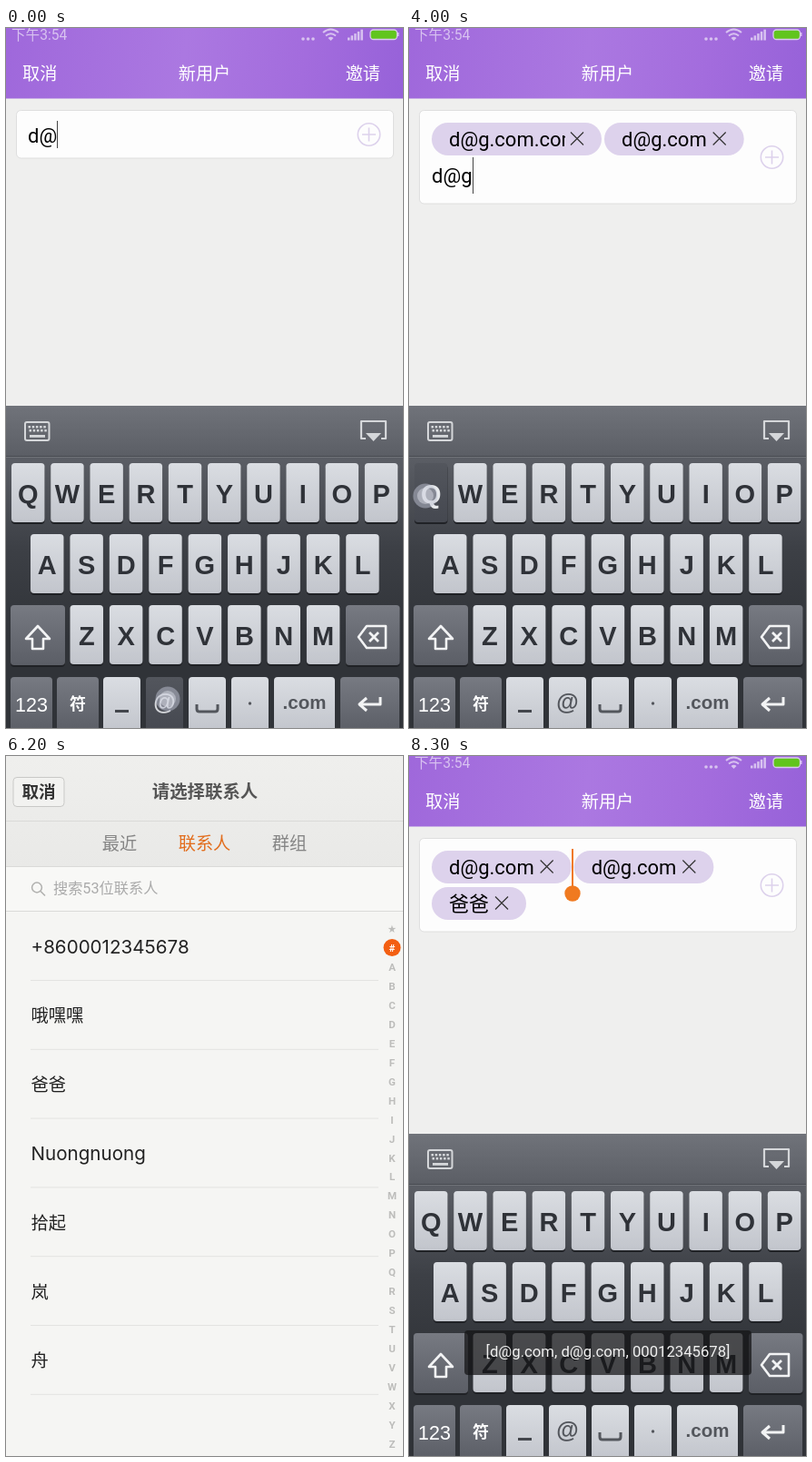
An HTML page with a canvas for the animation above (8600 ms loop, 437 px wide and 769 px high).

```html
<!DOCTYPE html>
<html lang="zh-CN">
<head>
<meta charset="utf-8">
<style>
html, body { margin: 0; width: 100%; height: 100%; overflow: hidden; background: #efefee }
canvas { display: block }
</style>
</head>
<body>
<canvas id="stage" width="437" height="769"></canvas>
<script>
const c = document.getElementById('stage').getContext('2d');
const LOOP = 8600, STEP = 100;
const UI = 'Roboto,"Noto Sans CJK SC","Noto Sans CJK",sans-serif';
const KEYS = '"Liberation Sans",Arial,sans-serif';
const LIST = 'Inter,"Noto Sans CJK SC","Noto Sans CJK",sans-serif';
const MAIL = 'd@g.com', LONG = MAIL + '.com', DAD = '爸爸', PHONE = '00012345678';
const INPUT = 22, CHIP = '#ddd2ec';

// Each entry: start time, chips, text being typed
const edits = [
  [0, [], 'd@'], [200, [], 'd@g'], [500, [], MAIL], [700, [], LONG],
  [1400, [LONG], ''], [1900, [LONG], 'd'], [2100, [LONG], 'd@'], [2300, [LONG], 'd@g'], [2600, [LONG], MAIL],
  [3000, [LONG, MAIL], ''], [3700, [LONG, MAIL], 'd'], [3900, [LONG, MAIL], 'd@'],
  [4000, [LONG, MAIL], 'd@g'], [4200, [LONG, MAIL], MAIL],
  [4400, [LONG, MAIL, MAIL], ''], [6500, [LONG, MAIL, MAIL, DAD], ''], [7100, [MAIL, MAIL, DAD], '']
];

// Each entry: start, end, x, y
const taps = [
  [-100, 100, 178, 737], [100, 300, 22, 512], [400, 600, 330, 742], [600, 800, 330, 742], [1300, 1500, 374, 734],
  [1900, 2100, 19, 514], [2100, 2300, 176, 740], [2300, 2500, 20, 512], [2500, 2800, 328, 740], [3000, 3200, 389, 729],
  [3700, 3900, 16, 512], [3900, 4000, 176, 740], [4000, 4200, 18, 514], [4200, 4300, 328, 741], [4300, 4600, 388, 723],
  [5100, 5300, 399, 142], [6000, 6200, 237, 351], [7000, 7200, 185, 122], [7800, 8000, 402, 49]
];
const cursorOff = [[1000, 1300], [1700, 1900], [3400, 3700], [4800, 5200]];

const clamp = v => Math.max(0, Math.min(1, v));

function fade(y0, y1, ...colors) {
  const g = c.createLinearGradient(0, y0, 0, y1);
  colors.forEach((col, i) => g.addColorStop(i / (colors.length - 1), col));
  return g;
}

function rect(x, y, w, h, fill) {
  c.fillStyle = fill;
  c.fillRect(x, y, w, h);
}

function round(x, y, w, h, r, fill, stroke, lw = 1) {
  c.beginPath();
  c.roundRect(x, y, w, h, r);
  if (fill) { c.fillStyle = fill; c.fill(); }
  if (stroke) { c.strokeStyle = stroke; c.lineWidth = lw; c.stroke(); }
}

function circle(x, y, r, fill, stroke, lw = 1) {
  round(x - r, y - r, 2 * r, 2 * r, r, fill, stroke, lw);
}

function line(d, color, lw = 1, fill) {
  const p = new Path2D(d);
  c.strokeStyle = color;
  c.lineWidth = lw;
  c.lineJoin = 'round';
  if (fill) { c.fillStyle = fill; c.fill(p); }
  if (lw) c.stroke(p);
}

function text(s, x, y, size, color, align = 'left', family = UI, weight = 400) {
  c.font = `${weight} ${size}px ${family}`;
  c.textAlign = align;
  c.fillStyle = color;
  c.fillText(s, x, y);
}

function width(s) {
  c.font = `400 ${INPUT}px ${UI}`;
  return c.measureText(s).width;
}

function header(t) {
  const g = c.createLinearGradient(0, 0, 437, 60);
  g.addColorStop(0, '#9f68db');
  g.addColorStop(.45, '#ab78e1');
  g.addColorStop(.75, '#a36cdd');
  g.addColorStop(1, '#9762d9');
  rect(0, 0, 437, 77.5, g);
  c.save();
  c.globalAlpha = t >= 6500 && t < 6800 ? .6 : 1;
  const pale = '#d8c2f0';
  text('下午3:54', 6, 13, 15.6, pale);
  for (const x of [327, 332.5, 338]) circle(x, 12, 1.8, pale);
  line('M349 5Q357.500 -2 366 5M352 8.500Q357.500 4 363 8.500', pale, 2);
  line('M354.500 11Q357.500 8.500 360.500 11L357.500 14Z', pale, 0, pale);
  for (let i = 0; i < 5; i++) rect(376 + i * 3.6, 10.5 - i * 2.2, 2.5, 3 + i * 2.2, pale);
  round(401, 2, 29.5, 10.5, 3.5, '#61c51d', '#d9ccec', 1.3);
  rect(431, 5, 1.5, 4, pale);
  c.restore();
  text('取消', 18, 57, 19.2, '#fff');
  text('新用户', 218.5, 57, 19.2, '#fff', 'center');
  text('邀请', 412, 57, 19.2, '#fff', 'right');
}

function form(t) {
  const [, chips, typed] = edits.findLast(e => e[0] <= t);
  let x = 25, row = 0, end = 25;
  const placed = chips.map(s => {
    const w = Math.min(width(s), 127) + 60;
    if (x + w > 376) { x = 25; row++; }
    const chip = { s, x, y: 104 + row * 40, w };
    end = x + w;
    x = end + 3;
    return chip;
  });
  const tw = width(typed);
  if (typed && chips.length && x + tw > 376) { x = 25; row++; }
  const h = chips.length ? 62 + row * 40 : 52;

  round(11.5, 90.5, 415, h + .5, 5, '#fdfdfd', '#dedede');
  const py = 91 + h / 2;
  circle(399.5, py, 12.2, null, CHIP, 1.6);
  line(`M392 ${py}h15M399.500 ${py - 7.5}v15`, CHIP, 1.6);

  for (const { s, x, y, w } of placed) {
    round(x, y, w, 36, 18, CHIP);
    c.save();
    c.beginPath();
    c.rect(x, y, w - 40, 36);
    c.clip();
    text(s, x + 19, y + 26, INPUT, '#000');
    c.restore();
    const k = x + w - 27;
    line(`M${k - 7} ${y + 10.5}l14 14m0 -14l-14 14`, '#333', 1.2);
  }

  const tx = chips.length ? x : 24;
  if (typed) text(typed, tx, chips.length ? 130 + row * 40 : 126, INPUT, '#000');
  if (t >= 7100) {
    rect(179, 102, 2, 42, '#f07a20');
    circle(180, 151, 8.7, '#f07a20');
  } else if (!cursorOff.some(([a, b]) => t >= a && t < b)) {
    const cx = typed ? tx + tw : end + 1;
    rect(Math.round(cx), 102 + row * 40, 1, chips.length ? 40 : 30, '#444');
  }
}

function key(x, y, w, h, dark, touch) {
  const down = touch && touch[2] >= x && touch[2] <= x + w && touch[3] >= y && touch[3] <= y + h;
  round(x, y + 2, w, h, 4, '#202226');
  const shades = down ? ['#53565d', '#454850'] : dark ? ['#777a82', '#5b5e66'] : ['#dadde2', '#c2c5cc'];
  round(x, y, w, h, 4, fade(y, y + h, ...shades));
  return down;
}

function keyboard(dy, touch) {
  if (dy >= 354) return;
  c.save();
  c.translate(0, dy);
  rect(0, 415, 437, 56, fade(415, 471, '#70737a', '#5b5e65'));
  rect(0, 471, 437, 298, fade(471, 769, '#5b5e65', '#3d4046', '#303338', '#303338'));
  rect(0, 470, 437, 1, '#484b51');
  rect(0, 471, 437, 1, '#6f7278');

  const pale = '#d5d7da';
  round(21, 433, 26.5, 20, 2, null, pale, 2);
  for (let r = 0; r < 2; r++)
    for (let i = 0; i < 5; i++) rect(24.5 + i * 4.2 + r, 437 + r * 4, 2.5, 2.5, pale);
  rect(26, 447, 17, 2.8, pale);
  line('M396 451H391V432H418V451H413', pale, 2.2);
  line('M396 445h17l-8.500 9z', pale, 0, pale);

  const letters = (s, x, y, step) => [...s].forEach((ch, i) => {
    const kx = x + i * step;
    const down = key(kx, y, 36.5, 65, false, touch);
    text(ch, kx + 18.3, y + 43.5, 29, down ? '#e8eaed' : '#2f3238', 'center', KEYS, 700);
  });
  letters('QWERTYUIOP', 6, 478, 43.2);
  letters('ASDFGHJKL', 27, 556, 43.4);
  letters('ZXCVBNM', 70.5, 634, 43.4);

  key(5, 634, 60, 66, true, touch);
  key(374, 634, 59.5, 66, true, touch);
  line('M35 657L48 671H41V682H29V671H22Z', '#f2f3f4', 2.6);
  line('M397 657H418V681H397L388 669Z', '#f2f3f4', 2.6);
  line('M400 664l10 10m0 -10l-10 10', '#f2f3f4', 2.8);

  const bottom = [[5, 46, 1], [56, 46, 1], [107, 41], [154, 41], [201, 41], [248, 41], [295, 67], [368, 65, 1]]
    .map(([x, w, dark]) => key(x, 713, w, 60, dark, touch));
  const ink = i => bottom[i] ? '#d5d7db' : '#53565c';
  text('123', 28, 751, 21.5, '#fff', 'center', KEYS);
  text('符', 79, 749, 18, '#fff', 'center', UI, 700);
  rect(120, 749, 15, 3, '#43464c');
  text('@', 174.5, 749, 25, ink(3), 'center', KEYS, 700);
  line('M210 743V748Q210 751 213 751H230Q233 751 233 748V743', '#53565c', 3);
  circle(268.5, 742, 1.7, '#53565c');
  text('.com', 328.5, 748, 20.5, ink(6), 'center', KEYS, 700);
  line('M412 735V743H391M397 736L389 743L397 750', '#f2f3f4', 3);
  c.restore();
}

function contacts() {
  rect(0, 0, 437, 769, '#f5f5f3');
  rect(0, 0, 437, 121, fade(0, 121, '#efefed', '#e9e9e7'));
  rect(0, 121, 437, 49, '#f8f8f6');
  for (const y of [71, 121, 170]) rect(0, y, 437, 1, '#dadad8');
  round(8, 23.5, 56, 32, 4, '#f2f2f0', '#c9c9c7');
  text('取消', 36, 46, 18.6, '#333', 'center', UI, 700);
  text('请选择联系人', 219, 46, 19.4, '#555', 'center', UI, 700);
  text('最近', 125, 103, 19.2, '#858585', 'center');
  text('联系人', 218.5, 103, 19.2, '#e26d1d', 'center');
  text('群组', 312, 103, 19.2, '#858585', 'center');
  circle(34, 144.5, 5.4, null, '#b0b0ae', 1.5);
  line('M38 148.500l5 5', '#b0b0ae', 1.6);
  text('搜索53位联系人', 52, 151, 16.2, '#aaa');

  ['+86' + PHONE, '哦嘿嘿', DAD, 'Nuongnuong', '拾起', '岚', '舟'].forEach((s, i) => {
    const size = s.charCodeAt(0) < 128 ? 20.6 : 19.3;
    text(s, 27.5, 216.5 + i * 75.8, size, '#222', 'left', LIST);
    rect(27, 246 + i * 75.8, 383, 1, '#e3e3e1');
  });

  circle(425, 210.5, 9.5, '#f35f12');
  [...'★#ABCDEFGHIJKLMNOPQRSTUVWXYZ'].forEach((ch, i) =>
    text(ch, 425, 194 + i * 20.96, 11.5, i === 1 ? '#fff' : '#bdbdbb', 'center', 'Roboto,"DejaVu Sans",sans-serif', 700));
}

function toast(a) {
  if (!a) return;
  c.save();
  c.globalAlpha = a;
  round(61, 631, 316, 49, 4, 'rgba(18,18,20,.72)');
  text(`[${MAIL}, ${MAIL}, ${PHONE}]`, 219, 660, 16.7, '#f0f0f0', 'center');
  c.restore();
}

function draw(t) {
  const touch = taps.find(([a, b]) => t >= a && t < b);
  const pressed = touch && t < touch[0] + 200 ? touch : null;
  const slide = t < 7000 ? clamp((t - 5200) / 350) : (1 - clamp((t - 7000) / 400)) ** 2;
  const listAlpha = t < 6400 ? clamp((t - 5200) / 200) : clamp((6700 - t) / 300);

  rect(0, 0, 437, 769, '#efefee');
  text('输入手机号/邮箱,按回车键确认', 219.5, 498, 19.3, '#777', 'center');
  header(t);
  form(t);
  if (listAlpha) {
    c.save();
    c.globalAlpha = listAlpha;
    contacts();
    c.restore();
  }
  keyboard(slide * 354, pressed);
  toast(clamp((t - 7800) / 300));
  if (touch) {
    const [, , x, y] = touch;
    circle(x, y, 13.5, 'rgba(190,194,210,.5)');
    circle(x, y, 9, 'rgba(225,227,236,.45)');
  }
}

function frame(now) {
  draw(Math.floor(now % LOOP / STEP) * STEP);
  requestAnimationFrame(frame);
}
requestAnimationFrame(frame);
</script>
</body>
</html>
```
